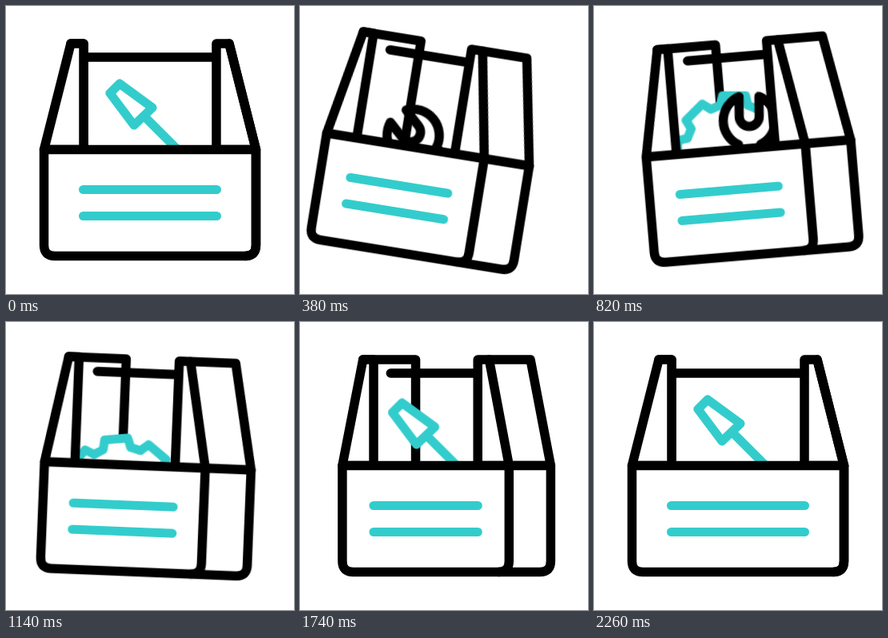
An HTML page without scripts that plays this animation: 360x360 px, repeating every 2.4 s.

```html
<!DOCTYPE html>
<html lang="en">
<head>
<meta charset="utf-8">
<title>Swinging toolbox</title>
<style>
  html, body { margin: 0; width: 100%; height: 100%; overflow: hidden; background: #fff; }
  svg { display: block; width: 100%; height: 100%; }
  path, circle { fill: #fff; stroke: #000; stroke-width: 11.5; stroke-linecap: round; stroke-linejoin: round; }
  .teal path { stroke: #3cc; stroke-width: 11; }
  .open { fill: none; }
  .core { stroke: none; }

  .box, .wrench, .gear, .driver, .slide, .morph { animation: 2400ms linear infinite; }
  .box { transform-origin: 171px 44px; animation-name: swing; }
  .wrench { animation-name: wrench; }
  .gear { animation-name: gear; }
  .driver { animation-name: driver; }
  .slide { animation-name: slide; }
  /* --a: front view, --b: turned while swinging, --c: turned at rest */
  .morph { d: var(--a); animation-name: turn; }

  @keyframes swing {
    0% { transform: rotate(0deg); animation-timing-function: cubic-bezier(.37,0,.63,1); }
    18.33% { transform: rotate(9.6deg); animation-timing-function: cubic-bezier(.37,0,.63,1); }
    34.17% { transform: rotate(-4.8deg); animation-timing-function: cubic-bezier(.37,0,.63,1); }
    47.5% { transform: rotate(2.3deg); animation-timing-function: cubic-bezier(.37,0,.63,1); }
    59.17%, 100% { transform: rotate(0deg); }
  }
  @keyframes turn {
    0% { d: var(--a); animation-timing-function: ease; }
    16% { d: var(--b); }
    34.17% { d: var(--b); }
    59.17% { d: var(--c, var(--b)); animation-timing-function: cubic-bezier(.85,0,.5,.9); }
    94.17%, 100% { d: var(--a); }
  }
  @keyframes slide {
    0% { transform: translateX(0); animation-timing-function: ease; }
    16%, 59.17% { transform: translateX(-16px); animation-timing-function: cubic-bezier(.85,0,.5,.9); }
    94.17%, 100% { transform: translateX(0); }
  }
  @keyframes driver {
    0% { transform: translateY(0); animation-timing-function: ease-in; }
    13.3%, 60% { transform: translateY(95px); animation-timing-function: cubic-bezier(.33,1,.68,1); }
    79.2%, 100% { transform: translateY(0); }
  }
  @keyframes wrench {
    0%, 6% { transform: translate(160px, 235px) rotate(-60deg); animation-timing-function: ease-out; }
    15.8% { transform: translate(164px, 168px) rotate(-47deg); animation-timing-function: ease-in-out; }
    34.17% { transform: translate(185.4px, 149.6px) rotate(4deg); animation-timing-function: ease-in; }
    45.8%, 100% { transform: translate(190px, 235px) rotate(20deg); }
  }
  @keyframes gear {
    0%, 18% { transform: translate(164px, 265px) rotate(20deg); animation-timing-function: ease-out; }
    34.17% { transform: translate(163.6px, 182.5px) rotate(4.7deg); animation-timing-function: ease-in; }
    47.5% { transform: translate(150.6px, 217.4px) rotate(-7deg); }
    59.17% { transform: translate(112px, 242px) rotate(-9deg); }
    63.5%, 100% { transform: translate(100px, 265px) rotate(-12deg); }
  }
</style>
</head>
<body>
<svg viewBox="0 0 360 360">
  <defs class="teal">
    <clipPath id="inside"><path d="M0 0H360V179H0Z"/></clipPath>
    <path id="tooth" d="M-29.1-53.6L-17.3-58.5L-14.4-70.6H14.4L17.3-58.5"/>
  </defs>
  <g class="box">
    <!-- inner wall and handle -->
    <path class="morph open" style="--a:path('M81 47L97 47L97 179');--b:path('M78.5 47L151.5 47L151.5 179');--c:path('M78.5 47L149.5 47L149.5 179')"/>
    <path class="morph open" style="--a:path('M97 64L263 64');--b:path('M115 64L218 64')"/>

    <g clip-path="url(#inside)">
      <g class="gear">
        <circle class="core" r="60"/>
        <use href="#tooth" transform="rotate(-90)"/>
        <use href="#tooth" transform="rotate(-45)"/>
        <use href="#tooth"/>
        <use href="#tooth" transform="rotate(45)"/>
        <use href="#tooth" transform="rotate(90)"/>
      </g>
      <g class="wrench">
        <path d="M-12.5-35V-10A12.5 12.5 0 0 0 12.5-10V-35A33 33 0 0 1 14 25V100H-14V25A33 33 0 0 1-12.5-35Z"/>
      </g>
      <g class="slide">
        <g class="driver teal">
          <path d="M173 138L225 190"/>
          <path d="M142 97L183 127L160 149L130 109Z"/>
        </g>
      </g>
    </g>

    <!-- end panels -->
    <path class="morph" style="--a:path('M47.5 179.5L81 47L97 47L97 179.5Z');--b:path('M53.5 179.5L78.5 47L91.5 47L91.5 179.5Z')"/>
    <path class="morph" style="--a:path('M263 179.5L263 47L279 47L312.5 179.5Z');--b:path('M215.5 179.5L215.5 47L285.5 47L310 179.5Z');--c:path('M218 179.5L218 47L289 47L313.5 179.5Z')"/>
    <path class="morph open" style="--a:path('M279 47L312.5 179.5');--b:path('M229.5 47L253 179.5');--c:path('M232 47L256 179.5')"/>

    <!-- body, front edge and label lines -->
    <path class="morph" style="--a:path('M47.5 179.5L312.5 179.5L312.5 299Q312.5 312.5 299 312.5L61 312.5Q47.5 312.5 47.5 299Z');--b:path('M53.5 179.5L310 179.5L310 299Q310 312.5 296.5 312.5L67 312.5Q53.5 312.5 53.5 299Z');--c:path('M53.5 179.5L313.5 179.5L313.5 299Q313.5 312.5 300 312.5L67 312.5Q53.5 312.5 53.5 299Z')"/>
    <path class="morph open" style="--a:path('M312.5 179.5L312.5 299Q312.5 312.5 299 312.5');--b:path('M253 179.5L253 299Q253 312.5 239.5 312.5');--c:path('M256 179.5L256 299Q256 312.5 242.5 312.5')"/>
    <g class="teal">
      <path class="morph open" style="--a:path('M96.5 229.5L263.5 229.5M96.5 262.5L263.5 262.5');--b:path('M91.5 229.5L215 229.5M91.5 262.5L215 262.5');--c:path('M91.5 229.5L218 229.5M91.5 262.5L218 262.5')"/>
    </g>
  </g>
</svg>
</body>
</html>
```
